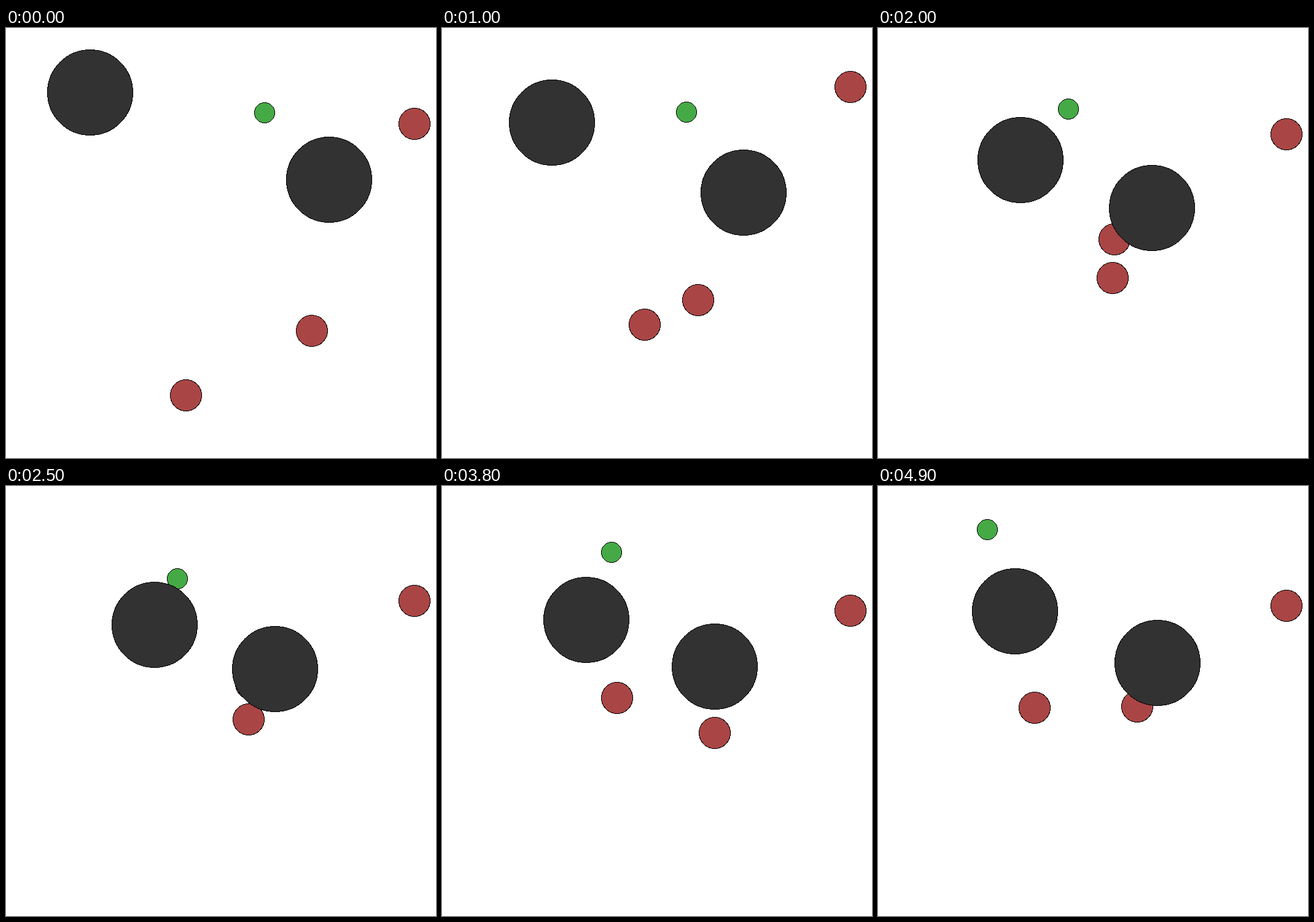
Write an HTML page that moves like this. It is 700 px wide and 700 px high and loops after 5000 ms.

```html
<!DOCTYPE html>
<html lang="en">
<head>
<meta charset="utf-8">
<title>Circles</title>
<style>
  html, body { margin: 0; width: 100%; height: 100%; overflow: hidden; background: #fff; }
  svg { display: block; width: 100vw; height: 100vh; }
  circle { stroke: #000; stroke-width: 1; shape-rendering: crispEdges; }
  .red { fill: #aa4545; }
  .green { fill: #45aa45; }
  .dark { fill: #323232; }
</style>
</head>
<body>
<svg viewBox="0 0 700 700">
  <circle id="redA" class="red" r="25.5"/>
  <circle id="redB" class="red" r="25.5"/>
  <circle id="redC" class="red" r="25.5"/>
  <circle id="green" class="green" r="16.5"/>
  <circle id="darkA" class="dark" r="69.5"/>
  <circle id="darkB" class="dark" r="69.5"/>
</svg>
<script>
const LOOP = 5000, STEP = 100;

// Key moments shared by every path, counted in steps.
const beats = [0, 10, 16, 25, 33, 38, 42, 49];
const last = beats.length - 1;
const gap = i => beats[i + 1] - beats[i];

// Smooth curve through one value per beat.
function glide(...v) {
  const rise = i => (v[i + 1] - v[i]) / gap(i);
  const inner = i => (rise(i - 1) * gap(i) + rise(i) * gap(i - 1)) / (gap(i - 1) + gap(i));
  const slope = i => i === 0 ? 2 * rise(0) - inner(1)
    : i === last ? 2 * rise(last - 1) - inner(last - 1)
    : inner(i);
  return t => {
    let i = 0;
    while (i < last - 1 && t >= beats[i + 1]) i++;
    const u = (t - beats[i]) / gap(i), w = 1 - u;
    return v[i] * w * w * (1 + 2 * u) + v[i + 1] * u * u * (3 - 2 * u)
      + gap(i) * u * w * (slope(i) * w - slope(i + 1) * u);
  };
}

// The dark circles approach each other on straight lines, then back off.
const slide = glide(0, 42.3, 80, 105, 104.5, 98, 85.5, 86);
const reach = t => 0.845 * slide(t) - 0.025 * t;

const paths = {
  redA: {
    x: glide(293, 330, 361, 399, 334, 285, 267, 255),
    y: glide(598, 483, 384, 322, 348, 345, 348, 361)
  },
  redB: {
    x: glide(498, 417, 382, 395, 415, 444, 443, 422),
    y: glide(493, 443, 430, 380, 387, 402, 409, 359)
  },
  redC: {
    x: () => 665,
    y: glide(156, 96, 152, 187, 197, 203, 202, 195)
  },
  green: {
    x: glide(421, 398, 344, 279, 282, 276, 248, 178),
    y: glide(138, 137, 118, 151, 119, 108, 88, 71)
  },
  darkA: { x: t => 137 + slide(t), y: t => 105 + 1.153 * slide(t) },
  darkB: { x: t => 526 - reach(t), y: t => 247.2 + 0.573 * reach(t) }
};

const parts = Object.entries(paths).map(([id, path]) => [document.getElementById(id), path]);

function draw(ms) {
  const t = Math.floor((ms % LOOP) / STEP);
  for (const [dot, path] of parts) {
    dot.setAttribute("cx", Math.round(path.x(t)));
    dot.setAttribute("cy", Math.round(path.y(t)));
  }
}

const start = performance.now();
function tick() {
  draw(performance.now() - start);
  requestAnimationFrame(tick);
}
tick();
</script>
</body>
</html>
```
